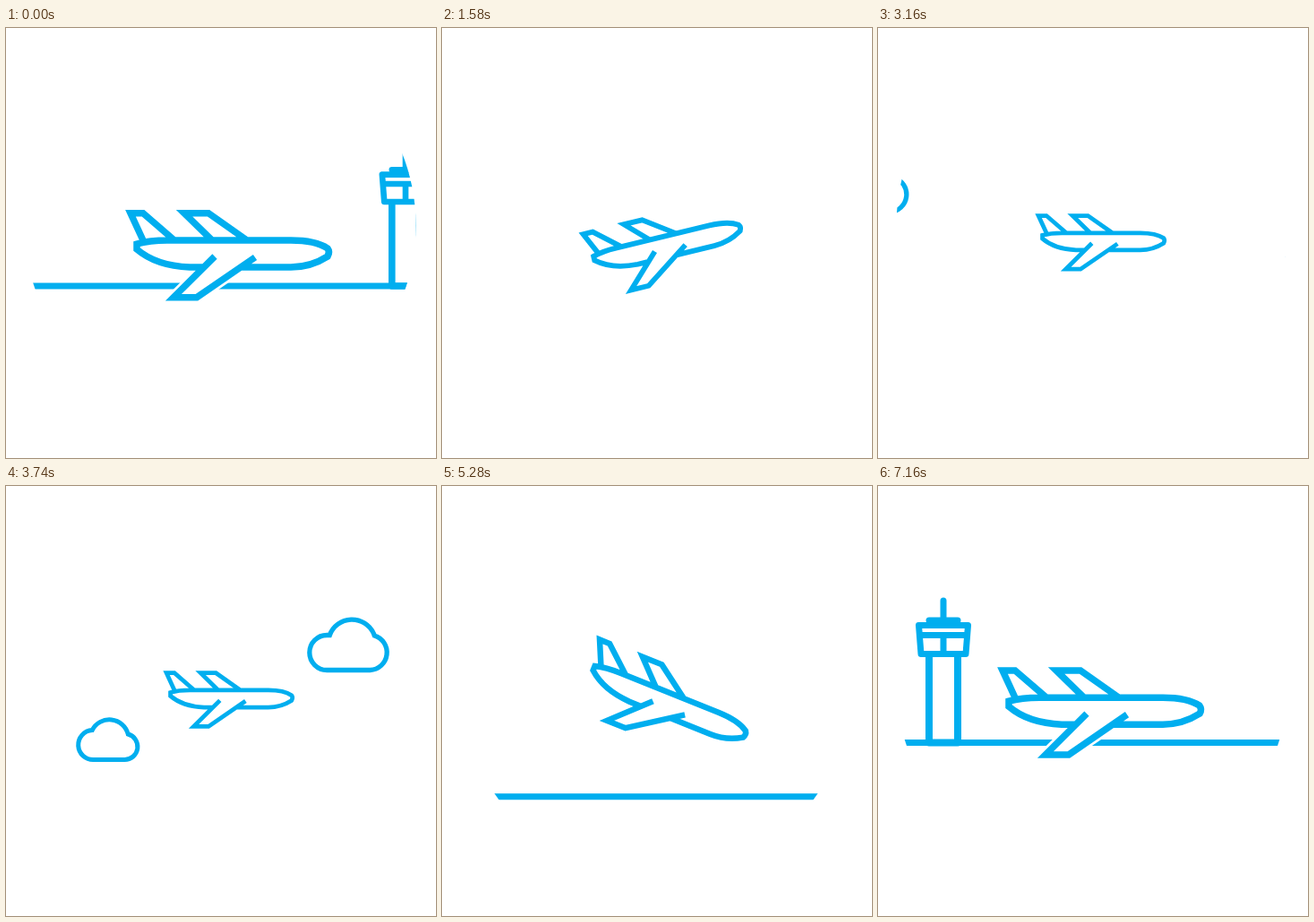
An HTML page that plays this animation: 480 px wide and 480 px high, repeating every 7.18 s.

```html
<!DOCTYPE html>
<html lang="en">
<head>
<meta charset="utf-8">
<title>Flight</title>
<style>
  html, body { margin: 0; height: 100%; overflow: hidden; background: #fff; }
  svg { display: block; width: 100%; height: 100%; }
  .line { fill: none; stroke: #00aeef; }
  .halo { fill: #fff; stroke: #fff; stroke-width: 13; }
</style>
</head>
<body>
<svg viewBox="0 0 480 480">
  <defs>
    <clipPath id="porthole"><circle cx="239" cy="220" r="218.5"/></clipPath>
    <path id="shape" d="M222 267H205C180 266 160 259 146 247V241C155 238.500 168 237 180 237H318
      C335 237 350 240 359 246Q362 250 359 255C348 262 335 267 318 267H262
      M233 255L187 300.700H213L278 256
      M230 237L199 206.700H226L269 237
      M153 237L139 206.700H153L188 237"/>
  </defs>
  <g clip-path="url(#porthole)">
    <path id="ground" class="line" stroke-width="7" d="M0 0H480"/>
    <g id="tower" class="line" stroke-width="7" stroke-linejoin="round">
      <path stroke-width="8" d="M-16 -98V0H16V-98"/>
      <path d="M-27.500 -131H27.500L25 -99H-25ZM-26 -120H26M0 -120V-99"/>
      <path d="M-16 -136.500H16M0 -158.500V-137" stroke-linecap="round"/>
    </g>
    <path id="highCloud" class="line" stroke-width="5.300" d="M-24 205.500A19.500 19.500 0 0 1 -24 166.500
      H-21A26.500 26.500 0 0 1 28 164.500L29 167A19.700 19.700 0 0 1 24 205.500Z"/>
    <path id="lowCloud" class="line" stroke-width="5" d="M-16 305.500A16.500 16.500 0 0 1 -18 272.500
      A21.500 21.500 0 0 1 22 277A14.500 14.500 0 0 1 18 305.500Z"/>
    <path id="streak" class="line" stroke-width="3.500" stroke-linecap="round" d="M-4 255.300H4"/>
  </g>
  <g id="plane">
    <use href="#shape" class="halo"/>
    <use href="#shape" class="line" stroke-width="7.500"/>
  </g>
</svg>
<script>
const LOOP = 7180;
const el = id => document.getElementById(id);
const place = (id, transform) => el(id).setAttribute('transform', transform);
const progress = (t, from, to) => Math.min(1, Math.max(0, (t - from) / (to - from)));
const smooth = (t, from, to) => {
  const u = progress(t, from, to);
  return u * u * (3 - 2 * u);
};

// Passes leftwards at constant speed, reappearing every `period` ms.
function drift(id, t, x, at, speed, period, passes) {
  let pos = -200;
  for (let i = 0; i < passes; i++) {
    const px = x - speed * (t - at - i * period);
    if (px > -60 && px < 540) pos = px;
  }
  place(id, `translate(${pos} 0)`);
}

function draw(t) {
  const landing = t > 3500;

  const climb = smooth(t, 640, 2280) - smooth(t, 4300, 5995);
  const scale = 1 - 0.365 * climb;
  const noseUp = 17 * (smooth(t, 400, 1250) - smooth(t, 1250, 2400));
  const noseDown = 28 * (smooth(t, 3900, 4700) - smooth(t, 5000, 5933));
  const x = 253 - 1.5 * climb;
  const y = (landing ? 251.2 : 252) - 13.7 * climb - 0.08 * noseDown;
  place('plane', `translate(${x} ${y}) rotate(${noseDown - noseUp}) scale(${scale}) translate(-253 -252)`);

  const groundY = landing
    ? 355.5 - 69 * smooth(t, 5140, 5770)
    : 288 + 67.5 * smooth(t, 705, 1335);
  place('ground', `translate(0 ${groundY})`);
  el('ground').setAttribute('opacity', landing ? progress(t, 5140, 5240) : 1 - progress(t, 1240, 1335));

  const towerX = landing
    ? 73 + 97 * ((7160 - Math.min(t, 7160)) / 1040) ** 3
    : 446 - 480 * progress(t, 320, 1020) ** 1.5;
  place('tower', `translate(${towerX} ${groundY}) scale(${landing ? 1 : 0.95})`);

  drift('highCloud', t, 271, 2520, 0.44, 1474, 2);
  drift('lowCloud', t, 115, 2334, 0.78, 1406, 2);
  drift('streak', t, 301.5, 2520, 0.8, 840, 3);
}

function frame(now) {
  draw(now % LOOP < 320 ? 0 : now % LOOP);
  requestAnimationFrame(frame);
}
draw(0);
requestAnimationFrame(frame);
</script>
</body>
</html>
```
